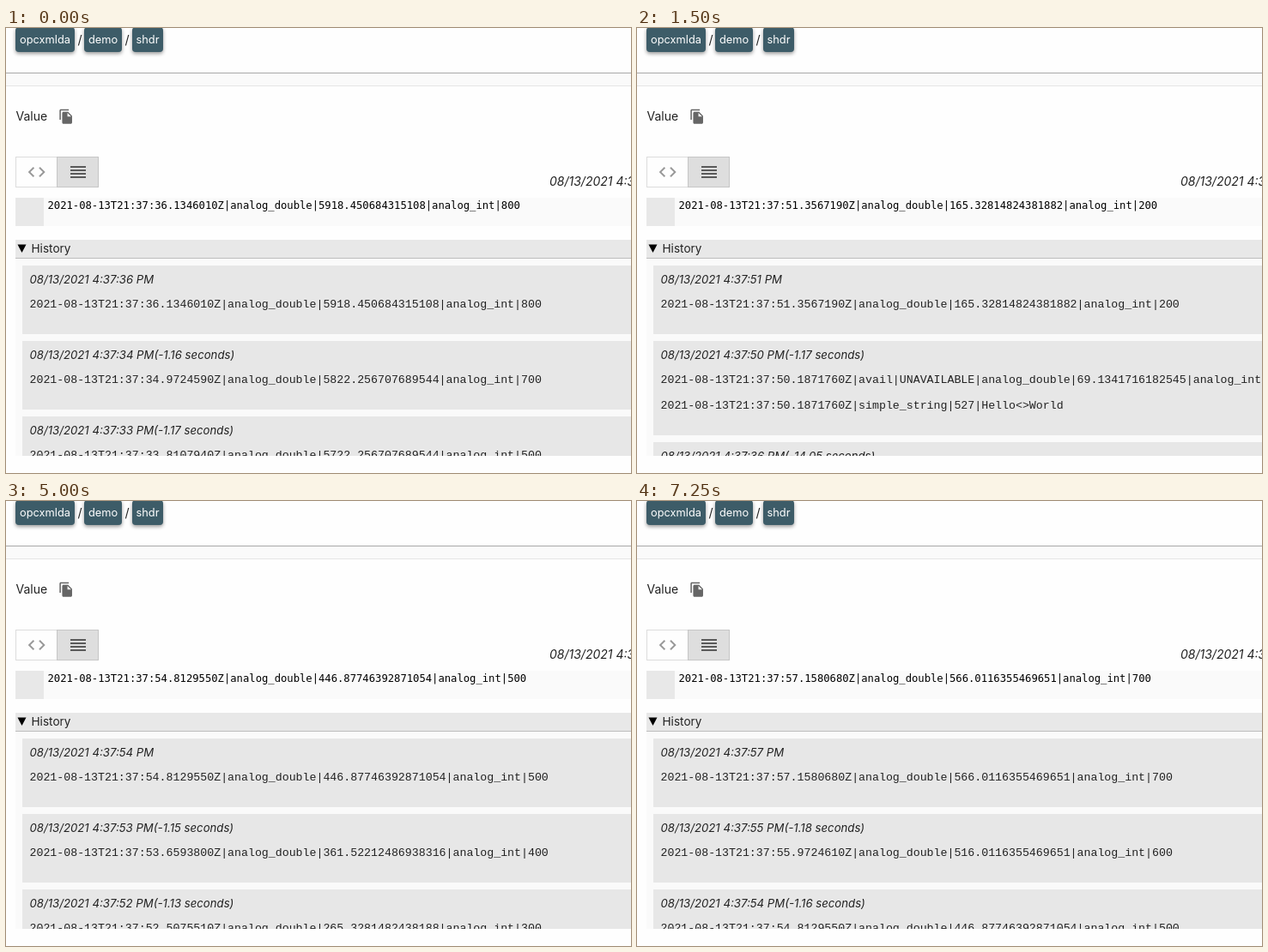
An HTML page with a canvas for the animation above (7.75 s loop, 728x519 px).

```html
<!DOCTYPE html>
<html lang="en">
<head>
<meta charset="utf-8">
<title>Value history</title>
<style>
  html, body { margin: 0; width: 100%; height: 100%; overflow: hidden; background: #fefefe; }
  canvas { display: block; }
</style>
</head>
<body>
<canvas id="stage" width="728" height="519"></canvas>
<script>
const W = 728, H = 519, LOOP = 7750;
const ctx = document.getElementById('stage').getContext('2d');

const SANS = 'Inter, "Liberation Sans", sans-serif';
const CODE = '12.2px "DejaVu Sans Mono", monospace';
const COURIER = '13.25px "Liberation Mono", monospace';

const COPY_ICON = new Path2D('M16 1H4c-1.1 0-2 .9-2 2v14h2V3h12V1zm-1 4l6 6v10c0 1.1-.9 2-2 2H7.99C6.89 23 6 22.1 6 21V7c0-1.1.89-2 1.99-2h7zm-1 7h5.5L14 6.5V12z');
const CODE_ICON = new Path2D('M9.4 16.6L4.8 12l4.6-4.6L8 6l-6 6 6 6 1.4-1.4zm5.2 0l4.6-4.6-4.6-4.6L16 6l6 6-6 6-1.4-1.4z');

// gap: seconds until the following record arrived
function record(sec, gap, ...bodies) {
  return {
    date: `08/13/2021 4:37:${sec.slice(0, 2)} PM`,
    gap,
    lines: bodies.map(b => `2021-08-13T21:37:${sec}Z|${b}`)
  };
}
const analog = (d, i) => `analog_double|${d}|analog_int|${i}`;

const records = [
  record('33.8107940', '1.17', analog('5722.256707689544', 500)),
  record('34.9724590', '1.16', analog('5822.256707689544', 700)),
  record('36.1346010', '14.05', analog('5918.450684315108', 800)),
  record('50.1871760', '1.17',
    'avail|UNAVAILABLE|' + analog('69.1341716182545', 0) + '|simple_string|527',
    'simple_string|527|Hello<>World'),
  record('51.3567190', '1.17', analog('165.32814824381882', 200)),
  record('52.5075510', '1.13', analog('265.3281482438188', 300)),
  record('53.6593800', '1.15', analog('361.52212486938316', 400)),
  record('54.8129550', '1.16', analog('446.87746392871054', 500)),
  record('55.9724610', '1.18', analog('516.0116355469651', 600)),
  record('57.1580680', '', analog('566.0116355469651', 700))
];

const FIRST = 2;
const arrivals = [0, 500, 1500, 2750, 3750, 5000, 6000, 7250];

function rect(x, y, w, h, color) {
  ctx.fillStyle = color;
  ctx.fillRect(x, y, w, h);
}

function text(str, x, y, font, color = '#222') {
  ctx.font = font;
  ctx.fillStyle = color;
  ctx.fillText(str, x, y);
}

function icon(path, x, y, scale, color) {
  ctx.save();
  ctx.translate(x, y);
  ctx.scale(scale, scale);
  ctx.fillStyle = color;
  ctx.fill(path);
  ctx.restore();
}

function chip(label, x, w) {
  ctx.save();
  ctx.shadowColor = 'rgba(0,0,0,.4)';
  ctx.shadowBlur = 4;
  ctx.shadowOffsetY = 2;
  ctx.fillStyle = '#3d5c68';
  ctx.beginPath();
  ctx.roundRect(x, -1, w, 29, 4);
  ctx.fill();
  ctx.restore();
  ctx.textAlign = 'center';
  text(label, x + w / 2, 18, `12.8px ${SANS}`, '#fff');
  ctx.textAlign = 'left';
}

function drawHeader() {
  rect(0, 0, W, 52, '#fefefe');
  chip('opcxmlda', 11, 69);
  chip('demo', 91, 44);
  chip('shdr', 147, 36);
  text('/', 83.5, 19, `14.3px ${SANS}`);
  text('/', 138.5, 19, `14.3px ${SANS}`);
  rect(0, 52, W, 1, '#a8a8a8');
  rect(0, 53, W, 14, '#fafafa');
  rect(0, 67, W, 1, '#e6e6e6');
}

function drawToolbar(date) {
  text('Value', 11.5, 108, `14px ${SANS}`);
  icon(COPY_ICON, 60.8, 94, 0.77, '#666');

  rect(59, 150, 49, 36, '#dedede');
  ctx.lineWidth = 1;
  ctx.strokeStyle = '#dcdcdc';
  ctx.strokeRect(11.5, 150.5, 48, 35);
  ctx.strokeStyle = '#c6c6c6';
  ctx.strokeRect(59.5, 150.5, 48, 35);
  icon(CODE_ICON, 23.7, 156, 1, '#999');
  for (let y = 161; y < 176; y += 4) rect(75, y, 18, 2, '#5a5a5a');

  text(date, 633, 184, `italic 14px ${SANS}`);
}

// Returns the bottom edge of the editor.
function drawEditor(lines) {
  const wide = lines.length > 1;
  const h = 1 + lines.length * 32;
  rect(11, 198, W - 11, h, '#fafafa');
  rect(11, 198, 33, h, '#e8e8e8');
  lines.forEach((line, i) => text(line, 48.5, 211 + i * 32, CODE, '#000'));
  if (!wide) return 198 + h;
  rect(11, 263, 622, 8, '#999');
  rect(633, 263, W - 633, 8, '#e4e4e4');
  return 271;
}

function drawCard(rec, y, newest) {
  const h = 50 + rec.lines.length * 30;
  rect(19, y, W - 19, h, '#e7e7e7');
  const title = newest ? rec.date : `${rec.date}(-${rec.gap} seconds)`;
  text(title, 27.5, y + 21, `italic 13.2px ${SANS}`);
  rec.lines.forEach((line, i) => text(line, 27.5, y + 49 + i * 30, COURIER));
  return y + h + 8;
}

function drawHistory(current, top) {
  rect(11, top, W - 11, 21, '#e8e8e8');
  rect(11, top + 21, W - 11, 1, '#bdbdbd');
  ctx.fillStyle = '#000';
  ctx.beginPath();
  ctx.moveTo(13.5, top + 5.5);
  ctx.lineTo(23.5, top + 5.5);
  ctx.lineTo(18.5, top + 15);
  ctx.fill();
  text('History', 29.5, top + 15, `13.6px ${SANS}`);

  const listTop = top + 22;
  ctx.save();
  ctx.beginPath();
  ctx.rect(11, listTop, W - 11, 230);
  ctx.clip();
  rect(11, listTop, W - 11, 230, '#fafafa');
  let y = listTop + 8;
  for (let i = current; i >= 0 && y < H; i--) {
    y = drawCard(records[i], y, i === current);
  }
  ctx.restore();
}

function draw(time) {
  const step = arrivals.filter(t => t <= time).length - 1;
  const current = FIRST + step;
  const rec = records[current];
  rect(0, 0, W, H, '#fefefe');
  drawHeader();
  drawToolbar(rec.date);
  const bottom = drawEditor(rec.lines);
  drawHistory(current, bottom + 16);
}

const start = performance.now();
function tick() {
  draw((performance.now() - start) % LOOP);
  requestAnimationFrame(tick);
}
tick();
</script>
</body>
</html>
```
